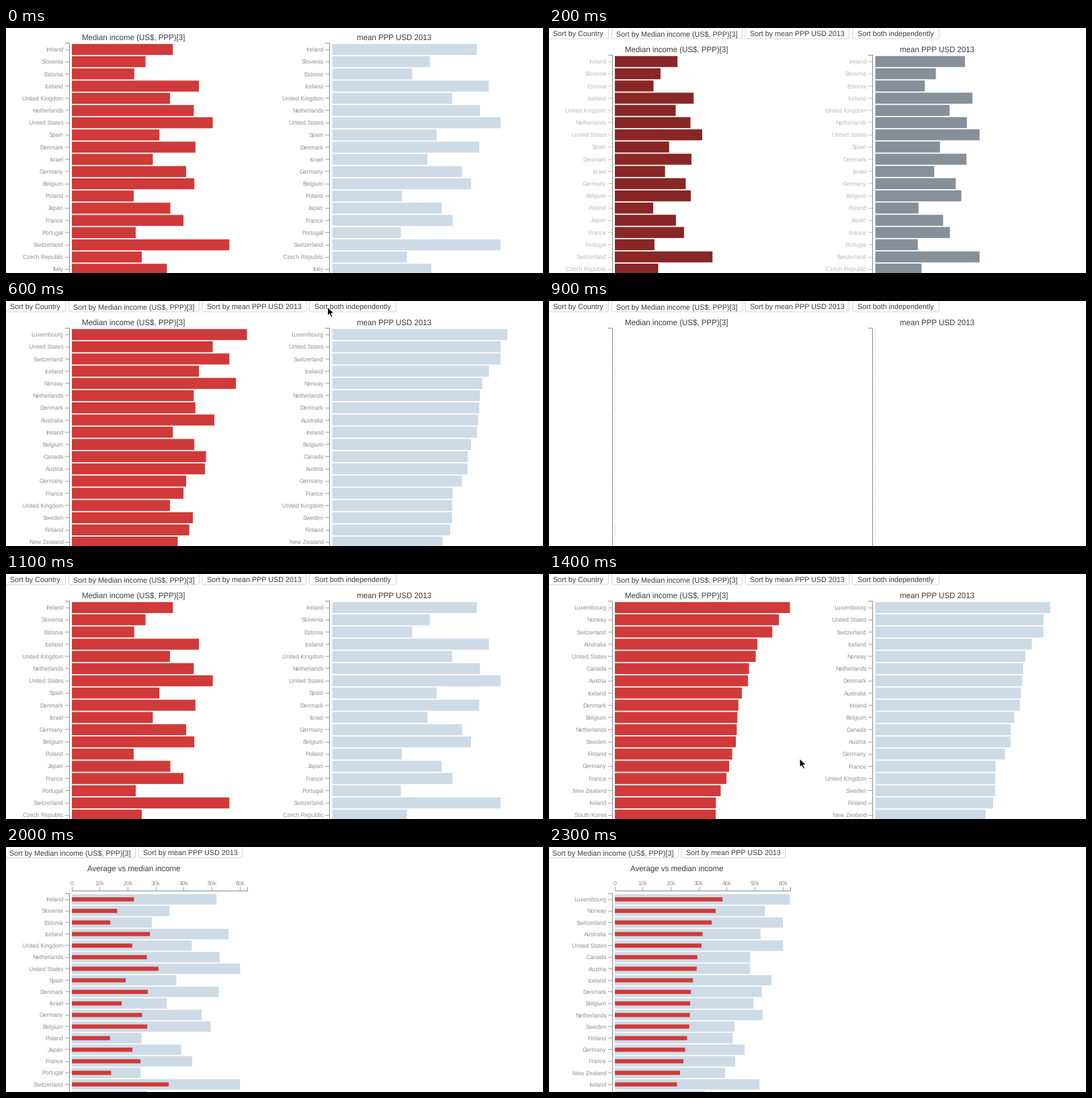
A matplotlib script that plays this animation: 799x365 px, repeating every 2.4 s.

```python
import numpy as np
import matplotlib.pyplot as plt
from matplotlib.animation import FuncAnimation
from matplotlib.patches import FancyBboxPatch, Polygon, Rectangle

W, H, DPI = 799, 365, 64
STEP, LOOP = 100, 2400
PX = 72 / DPI

plt.rcParams["font.family"] = "Liberation Sans"
plt.rcParams["text.hinting"] = "none"

RED = np.array([208, 58, 58]) / 255
BLUE = np.array([205, 219, 231]) / 255
INK, LABEL, AXIS, TICK = "#3c3c3c", "#919191", "#8c8c8c", "#a4a4a4"

MEDIAN, MEAN = "Median income (US$, PPP)[3]", "mean PPP USD 2013"

# country, median bar length, mean bar length
DATA = [
    ("Ireland", 150.3, 215.2), ("Slovenia", 109.6, 145.3),
    ("Estonia", 92.8, 118.9), ("Iceland", 189, 233),
    ("United Kingdom", 146, 178.3), ("Netherlands", 181.4, 219.8),
    ("United States", 209.6, 250.3), ("Spain", 130.2, 155.3),
    ("Denmark", 183.8, 218.7), ("Israel", 120.4, 141.5),
    ("Germany", 170, 193), ("Belgium", 182.2, 206.5),
    ("Poland", 92, 103.7), ("Japan", 146.6, 162.8),
    ("France", 166, 179), ("Portugal", 95, 102.1),
    ("Switzerland", 234.3, 250.2), ("Czech Republic", 104, 111),
    ("Italy", 141.3, 147.3), ("Luxembourg", 260.5, 260.5),
    ("Norway", 244, 223.2), ("Australia", 212, 216.8),
    ("Canada", 199.6, 201.5), ("Austria", 198, 201.2),
    ("Sweden", 180, 178.1), ("Finland", 174.6, 175.5),
    ("New Zealand", 157.5, 164), ("South Korea", 150, 134),
]

# start ms, view, sort column left, sort column right, scroll, reloaded
CUES = [
    (0, "pair", 0, 0, 18, False),
    (138, "pair", 0, 0, 0, True),
    (400, "pair", 1, 1, 0, False),
    (500, "pair", 2, 2, 0, False),
    (700, "pair", 1, 2, 0, False),
    (899.95, "pair", 0, 0, 0, True),
    (1200, "pair", 1, 2, 0, False),
    (1699.82, "overlay", 0, 0, 0, True),
    (2100, "overlay", 2, 2, 0, False),
    (2200, "overlay", 1, 1, 0, False),
]

# pointer visits: lists of (ms, x, y)
POINTER = [
    [(400, 190, 9), (500, 370, 9), (600, 478.5, 9), (800, 516, 6)],
    [(1200, 516, 9), (1400, 373, 275), (1500, 350, 318)],
    [(2100, 273, 9), (2200, 95, 1)],
]
ARROW = np.array([(0, 0), (0, 13), (3, 10.3), (5.2, 15.3), (7.4, 14.3),
                  (5.3, 9.4), (9.4, 9.2)])

fig = plt.figure(figsize=(W / DPI, H / DPI), dpi=DPI, facecolor="white")
ax = fig.add_axes([0, 0, 1, 1])


def text(x, y, s, size, color=INK, ha="center", alpha=1):
    """Text centred vertically on its capitals."""
    ax.text(x, y + 0.36 * size, s, fontsize=size * PX, color=color, ha=ha,
            va="baseline", alpha=alpha)


def line(xs, ys, color=AXIS, alpha=1):
    """Hairline; coordinates on half pixels stay crisp."""
    ax.plot(xs, ys, color=color, lw=PX, alpha=alpha, snap=False,
            solid_capstyle="butt", solid_joinstyle="miter")


def bar(x, mid, width, height, color, grow):
    shade = color * min(1, 0.1 + 0.9 * grow)
    ax.add_patch(Rectangle((x, mid - height / 2), width * grow, height,
                           fc=shade, ec="none", snap=False))


def button(x, right, label, dy):
    ax.add_patch(FancyBboxPatch((x + 3, -5 - dy), right - x - 6, 18,
                                boxstyle="round,pad=3,rounding_size=3.5",
                                fc="white", ec="#d6d6d6", lw=PX))
    text((x + right) / 2 - 0.3, 8.5 - dy, label, 10.75)


def ordered(column):
    return sorted(DATA, key=lambda d: -d[column]) if column else DATA


def y_axis(x, top, mids, names, grow):
    line([x - 6.5, x, x], [top, top, H + 9])
    for mid, name in zip(mids, names):
        if mid > H + 8:
            break
        line([x - 6.5, x - 0.5], [np.floor(mid) + 0.5] * 2, TICK, grow)
        text(x - 9, mid, name, 8.67, LABEL, "right", grow)


def panel(dx, title, column, sort, color, dy, grow):
    rows = ordered(sort)
    mids = 50 - dy + 18.19 * np.arange(len(rows))
    text(190 + dx, 32 - dy, title, 11.55)
    for row, mid in zip(rows, mids):
        bar(98 + dx, mid, row[column], 16.4, color, grow)
    y_axis(94.5 + int(dx), 40.5 - dy, mids, [r[0] for r in rows], grow)


def pair(left, right, dy, grow):
    button(-1.5, 88.5, "Sort by Country", dy)
    button(93.5, 287.5, "Sort by " + MEDIAN, dy)
    button(292, 446.5, "Sort by " + MEAN, dy)
    button(451.5, 580.5, "Sort both independently", dy)
    panel(0, MEDIAN, 1, left, RED, dy, grow)
    panel(387.5, MEAN, 2, right, BLUE, dy, grow)


def overlay(sort, _, dy, grow):
    button(-1.5, 192.5, "Sort by " + MEDIAN, dy)
    button(197, 351.5, "Sort by " + MEAN, dy)
    text(190, 32, "Average vs median income", 11.55)
    rows = ordered(sort)
    mids = 78 + 17.23 * np.arange(len(rows))
    for (_, median, mean), mid in zip(rows, mids):
        bar(98, mid, mean, 15.5, BLUE, grow)
        bar(98, mid, median * 0.615, 6.2, RED, grow)
    y_axis(94.5, 69.5, mids, [r[0] for r in rows], grow)
    line([98.5, 98.5, 359.5, 359.5], [59.5, 65.5, 65.5, 59.5])
    for k in range(0, 70, 10):
        x = 98 + 4.167 * k
        line([np.floor(x) + 0.5] * 2, [59.5, 65], TICK, grow)
        text(x, 54, f"{k}k" if k else "0", 8.67, LABEL, alpha=grow)


def pointer(t):
    for visit in POINTER:
        ts, xs, ys = zip(*visit)
        if ts[0] <= t <= ts[-1]:
            tip = np.interp(t, ts, xs), np.interp(t, ts, ys)
            ax.add_patch(Polygon(ARROW + tip, fc="black", ec="white",
                                 lw=PX, zorder=9))


def draw(i):
    t = i * STEP
    ax.clear()
    ax.set(xlim=(0, W), ylim=(H, 0))
    ax.axis("off")
    _, view, left, right, dy, _ = [c for c in CUES if c[0] <= t][-1]
    loads = [c[0] for c in CUES if c[5] and c[0] <= t]
    grow = min(1, (t - loads[-1]) / STEP) if loads else 1
    (pair if view == "pair" else overlay)(left, right, dy, grow)
    pointer(t)
    return []


anim = FuncAnimation(fig, draw, frames=LOOP // STEP, interval=STEP,
                     init_func=lambda: [], repeat=True, repeat_delay=0)
plt.show()
```
